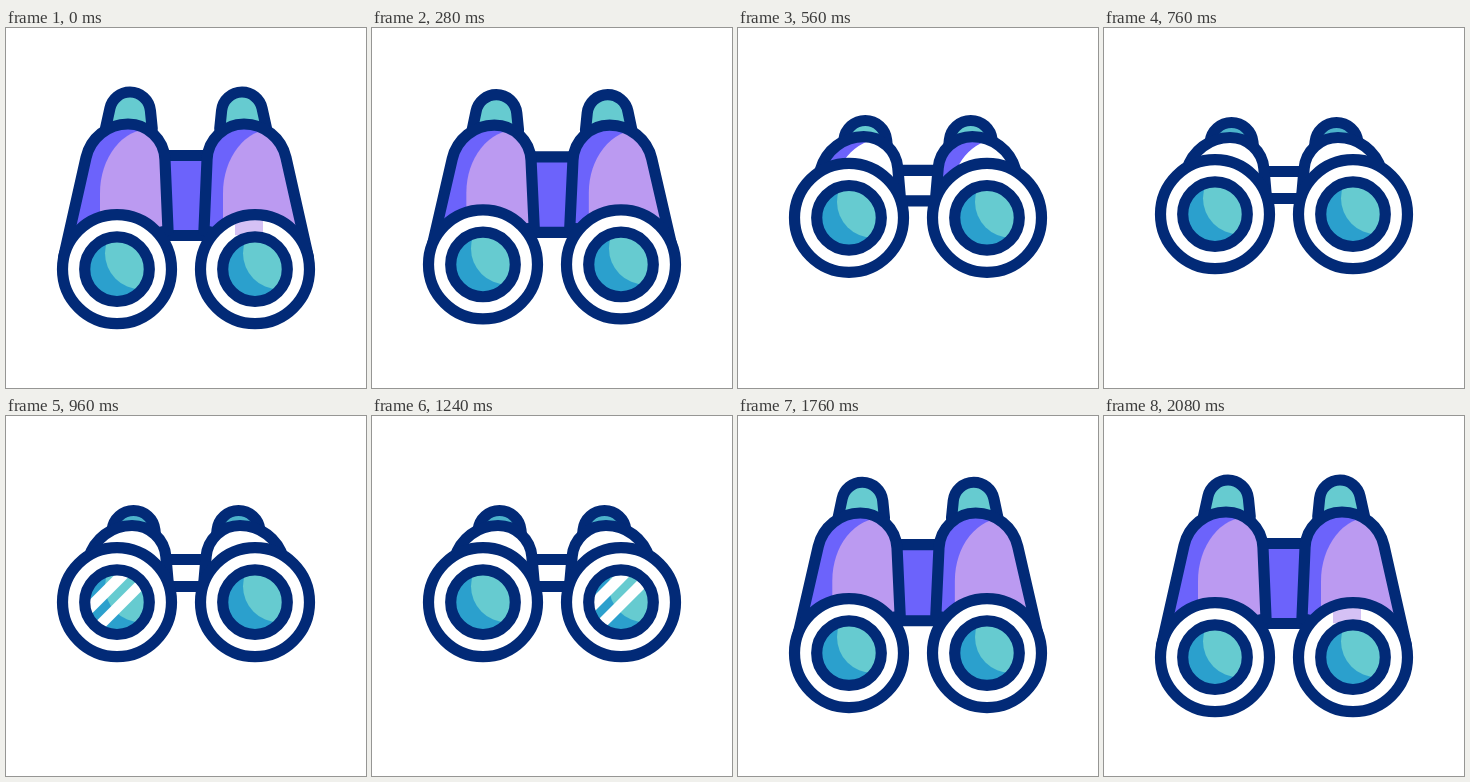
Recreate the animation shown at these times as an HTML page with a canvas. Size 360x360 px, loop 2.2 s.

```html
<!DOCTYPE html>
<html lang="en">
<head>
<meta charset="utf-8">
<title>Binoculars</title>
<style>
html, body { margin: 0; width: 100%; height: 100%; overflow: hidden; background: #fff; }
canvas { display: block; width: 360px; height: 360px; }
</style>
</head>
<body>
<canvas id="stage" width="360" height="360"></canvas>
<script>
const ctx = document.getElementById('stage').getContext('2d');
const LOOP = 2200, TILT = 600, DOWN = 150, UP = 1360;
const NAVY = '#022a77', VIOLET = '#6c63fb', LILAC = '#bb9af1', PALE = '#d5c1f5';
const TEAL = '#66cbd0', BLUE = '#2ba0cd', DUSK = '#4cb3cb', WHITE = '#fff';

const mix = (a, b, p) => a + (b - a) * p;

// cubic-bezier(.55, 0, .15, 1), solved by bisection
function ease(u) {
  if (u <= 0) return 0;
  if (u >= 1) return 1;
  let lo = 0, hi = 1, s;
  for (let i = 0; i < 24; i++) {
    s = (lo + hi) / 2;
    const x = 1.65 * s * (1 - s) ** 2 + 0.45 * s * s * (1 - s) + s ** 3;
    if (x < u) lo = s; else hi = s;
  }
  return s * s * (3 - 2 * s);
}

// Rounded arch: two leaning sides joined to a flat top at x.
function arch({ x, top, left, right, leanLeft, leanRight, depth }) {
  const reach = (r, lean) => r / Math.tan((Math.PI / 2 + Math.atan(lean)) / 2);
  const x0 = x - reach(left, leanLeft), x1 = x + reach(right, leanRight);
  const short = depth * 0.8;
  const path = new Path2D();
  path.moveTo(x0 - leanLeft * depth, top + depth);
  path.arcTo(x0, top, x, top, left);
  path.arcTo(x1, top, x1 + leanRight * short, top + short, right);
  path.lineTo(x1 + leanRight * short, top + short);
  path.closePath();
  return path;
}

const cap = p => arch({
  x: mix(124, 127.5, p), top: mix(64, 94.5, p),
  left: mix(20.5, 21.5, p), right: mix(20.5, 21.5, p),
  leanLeft: mix(0.22, 0.1, p), leanRight: 0.1, depth: mix(46, 30, p)
});

const body = p => arch({
  x: mix(122, 126, p), top: mix(96, 109.5, p),
  left: mix(43, 45, p), right: mix(37, 34, p),
  leanLeft: mix(0.225, 0.286, p), leanRight: mix(0.043, 0.088, p),
  depth: mix(133, 70, p)
});

// Lit side of a barrel, bounded by a quarter ellipse.
function sheen(p, dx) {
  const x = mix(144, 150, p) + dx, y = mix(165, 160, p);
  const rx = mix(50, 52, p), ry = mix(64, 50, p);
  const path = new Path2D();
  path.ellipse(x, y, rx, ry, 0, Math.PI * 1.5, Math.PI, true);
  path.lineTo(x - rx, 250);
  path.lineTo(360, 250);
  path.lineTo(360, y - ry);
  path.closePath();
  return path;
}

function disc(x, y, r) {
  const path = new Path2D();
  path.arc(x, y, r, 0, Math.PI * 2);
  return path;
}

function fill(path, color) {
  ctx.fillStyle = color;
  ctx.fill(path);
}

// Fills and outlines a shape, with optional details clipped inside it.
function paint(path, color, details) {
  fill(path, color);
  if (details) {
    ctx.save();
    ctx.clip(path);
    details();
    ctx.restore();
  }
  ctx.stroke(path);
}

function bridge(p, color) {
  const top = mix(127.5, 143.5, p), bottom = mix(207.5, 170.5, p);
  const path = new Path2D();
  path.rect(150, top, 60, bottom - top);
  paint(path, color);
}

function barrel(p, flip, look) {
  const side = path => {
    if (!flip) return path;
    const mirror = new Path2D();
    mirror.addPath(path, new DOMMatrix([-1, 0, 0, 1, 360, 0]));
    return mirror;
  };
  const shift = flip ? mix(123, 117, p) : 0;
  paint(side(cap(p)), look.cap);
  paint(side(body(p)), look.shade, () => fill(sheen(p, shift), look.light));
}

function stripe(x, width) {
  const path = new Path2D();
  path.moveTo(x - 50, 50);
  path.lineTo(x + 50, -50);
  path.lineTo(x + 50 + width, -50);
  path.lineTo(x - 50 + width, 50);
  fill(path, WHITE);
}

function lens(x, y, glint, tinted) {
  paint(disc(x, y, 54.5), WHITE, () => {
    ctx.fillStyle = PALE;
    if (tinted) ctx.fillRect(x - 20, y - 52, 28, 18);
  });
  paint(disc(x, y, 32.3), BLUE, () => {
    fill(disc(x + 24, y - 16, 36), TEAL);
    ctx.translate(x, y);
    stripe(glint - 23, 16);
    stripe(glint + 5, 15);
  });
}

function draw(t) {
  const during = (from, to, a, b) => t >= from && t < to ? a : b;
  const p = ease((t - DOWN) / TILT) - ease((t - UP) / TILT);
  const y = mix(241.2, 186.2, p);
  const glint = (t - 975) * 0.48;
  const look = {
    cap: during(680, 1440, DUSK, TEAL),
    shade: during(680, 1440, WHITE, VIOLET),
    light: during(480, 1600, WHITE, LILAC)
  };

  ctx.fillStyle = WHITE;
  ctx.fillRect(0, 0, 360, 360);
  ctx.strokeStyle = NAVY;
  ctx.lineWidth = 11.2;
  ctx.lineJoin = 'round';

  bridge(p, during(520, 1440, WHITE, VIOLET));
  barrel(p, false, look);
  barrel(p, true, look);
  lens(111, y, glint, false);
  lens(249, y, glint - 138, during(240, 1920, false, true));
}

const start = performance.now();
function tick() {
  draw((performance.now() - start) % LOOP);
  requestAnimationFrame(tick);
}
tick();
</script>
</body>
</html>
```
